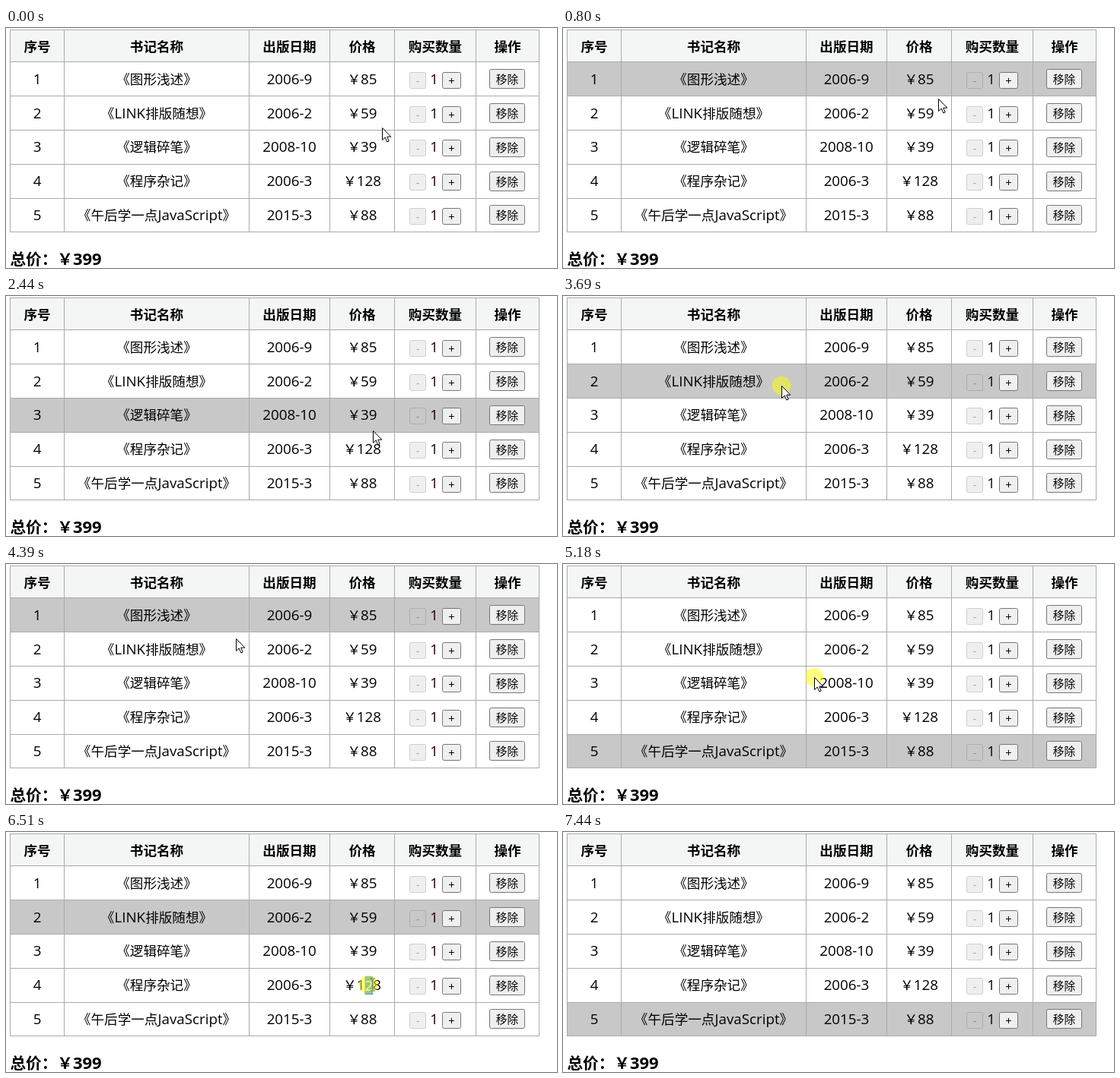
Write an HTML page that moves like this. It is 724 by 316 pixels and loops after 7.68 s.

```html
<!DOCTYPE html>
<html lang="zh-CN">
<head>
<meta charset="utf-8">
<title>书籍购物车</title>
<style>
  html, body { margin: 0; width: 100%; height: 100%; overflow: hidden; background: #fff; }
  svg { display: block; width: 724px; height: 316px; }
  text { font: 17.6px "Noto Sans CJK SC", "Noto Sans CJK JP", sans-serif; text-anchor: middle; }
  .lat { font-family: "Open Sans", "Noto Sans", sans-serif; font-size: 18.8px; }
  .head { font-weight: 700; }
  .total { font-size: 20.6px; font-weight: 700; text-anchor: start; }
  .total .lat { font-size: 22px; }
  .label { font-size: 14.67px; }
  .sign { font: 14.67px "Open Sans", sans-serif; }
  .button { fill: #efefef; stroke: #767676; }
  .off { fill: rgba(200,200,200,.29); stroke: rgba(118,118,118,.3); }
  .faint { fill: rgba(16,16,16,.3); }
</style>
</head>
<body>
<svg id="stage" viewBox="0 0 724 316"></svg>
<script>
const LOOP = 7680, START = 70, STEP = 78.4;
const stage = document.getElementById('stage');

const heads = ['序号', '书记名称', '出版日期', '价格', '购买数量', '操作'];
const books = [
  ['图形浅述', '2006-9', 85],
  ['LINK排版随想', '2006-2', 59],
  ['逻辑碎笔', '2008-10', 39],
  ['程序杂记', '2006-3', 128],
  ['午后学一点JavaScript', '2015-3', 88]
];
const colX = [5, 76, 319, 425, 510, 617, 700];
const midX = i => (colX[i] + colX[i + 1] + 1) / 2;
const rowTop = i => 44.4 + 44.8 * i;
const lineY = i => Math.round(rowTop(i));

// Stops of the pointer: step, x, y and the row clicked there.
// A click on a half step is too short to be seen.
const stops = [
  [-1, 494, 131],
  [4, 499, 73, 0],
  [13, 487, 113, 1],
  [18, 476, 181, 3],
  [23, 474, 237, 4],
  [29.5, 482, 177, 2],
  [35, 461, 115, 1],
  [39, 445, 89],
  [46, 287, 118, 1],
  [53, 299, 70, 0],
  [58, 318, 252, 4],
  [65, 330, 149, 2],
  [69.5, 345, 83, 0],
  [75, 389, 112, 1],
  [82, 476, 201, 3],
  [87, 532, 246, 4],
  [92, 712, 303]
];
const SELECT = 82, RESELECT = 87, GONE = 94;

function add(tag, attrs, parent = stage) {
  const el = document.createElementNS('http://www.w3.org/2000/svg', tag);
  for (const key in attrs) el.setAttribute(key, attrs[key]);
  parent.append(el);
  return el;
}

function rect(x, y, width, height, attrs) {
  return add('rect', { x, y, width, height, ...attrs });
}

// Latin runs get their own face and size
function write(str, x, y, cls = '') {
  const el = add('text', { x, y, class: cls });
  for (const part of String(str).match(/[\x20-\x7e]+|[^\x20-\x7e]+/g))
    add('tspan', /[\x20-\x7e]/.test(part) ? { class: 'lat' } : {}, el).textContent = part;
  return el;
}

function button(x, y, w, h, label, cls, textCls) {
  rect(x + .5, y + .5, w - 1, h - 1, { rx: 2, class: cls });
  add('text', { x: x + w / 2, y: y + h / 2 + 5.5, class: textCls }).textContent = label;
}

rect(5, 2, 696, 43, { fill: '#f4f6f5' });
const bands = books.map((_, i) =>
  rect(6, lineY(i) + 1, 694, lineY(i + 1) - lineY(i) - 1, { fill: '#c8c8c8' }));
for (const x of colX) rect(x, 2, 1, 267, { fill: '#aaa' });
rect(5, 2, 696, 1, { fill: '#aaa' });
for (let i = 0; i <= books.length; i++) rect(5, lineY(i), 696, 1, { fill: '#aaa' });

heads.forEach((h, i) => write(h, midX(i), 31, 'head'));
books.forEach(([name, date, price], i) => {
  const at = dy => Math.round(rowTop(i) + dy);
  const base = at(22.4) + 6.5;
  [i + 1, `《${name}》`, date, `\uffe5${price}`].forEach((s, c) => write(s, midX(c), base));
  button(530, at(13.4), 22, 22, '-', 'off', 'sign faint');
  write(1, 562.5, base).setAttribute('fill', '#200');
  button(573, at(13.4), 25, 22, '+', 'button', 'sign');
  button(635, at(9.8), 47, at(35.8) - at(9.8), '移除', 'button', 'label');
});
const sum = books.reduce((s, b) => s + b[2], 0);
write(`总价\uff1a\uffe5${sum}`, 5.5, 312, 'total');

const mark = add('g');
add('rect', { x: 471.5, y: 190, width: 10.5, height: 24, fill: '#3390ff' }, mark);
add('text', { x: 476.9, y: 208.5, class: 'lat', fill: '#fff' }, mark).textContent = '2';

const halo = add('circle', { r: 12.3, fill: 'rgba(255,255,0,.5)' });
const arrow = add('path', {
  d: 'M.5 .5V16.5L4.2 13L6.8 19L9.2 18L6.7 12.2H11.8Z', fill: '#fff', stroke: '#000'
});
const beam = add('path', {
  d: 'M3 -8H5.5M6.5 -8H9M6 -7.5V7.5M3 8H5.5M6.5 8H9', fill: 'none', stroke: '#555'
});

const ease = k => k * k * (3 - 2 * k);

// The pointer rests one step at each stop, then glides to the next
function pointAt(n) {
  const i = stops.findIndex(s => s[0] > n);
  if (i < 0) return stops[stops.length - 1].slice(1);
  const [n0, x0, y0] = stops[i - 1], [n1, x1, y1] = stops[i];
  const k = ease(Math.max(0, (n - n0 - 1) / (n1 - n0 - 1)));
  return [Math.round(x0 + (x1 - x0) * k), Math.round(y0 + (y1 - y0) * k)];
}

const show = (el, on) => el.setAttribute('visibility', on ? 'visible' : 'hidden');

function draw(time) {
  const n = Math.floor((time % LOOP - START) / STEP);
  const clicks = stops.filter(s => s.length > 3);
  const last = clicks.filter(s => s[0] < n).pop();
  bands.forEach((b, i) => show(b, last && i === last[3]));

  const [x, y] = pointAt(n);
  const overText = Math.abs(n - SELECT) <= 1;
  for (const el of [halo, arrow, beam]) el.setAttribute('transform', `translate(${x} ${y})`);
  show(halo, clicks.some(s => s[0] === n));
  show(arrow, !overText && n < GONE);
  show(beam, overText);
  show(mark, n >= SELECT && n < RESELECT);
}

function loop() {
  draw(performance.now());
  requestAnimationFrame(loop);
}
loop();
</script>
</body>
</html>
```
